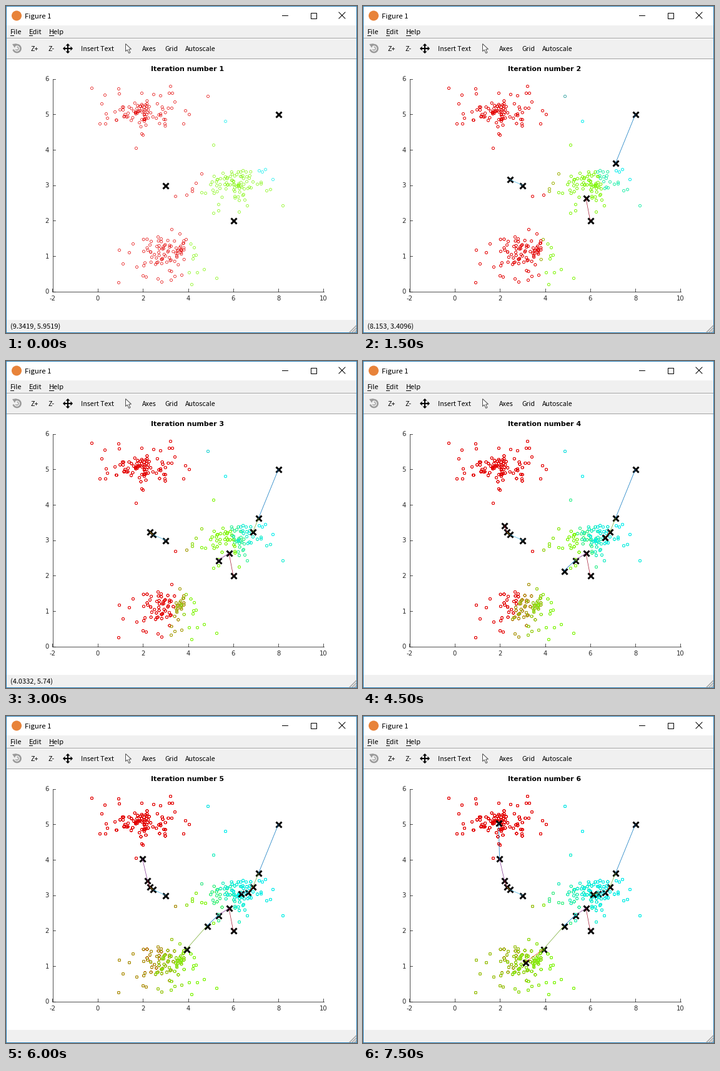
Write a matplotlib script that moves like this. It is 562 px wide and 523 px high and loops after 8000 ms.

```python
import numpy as np
import matplotlib.pyplot as plt
from matplotlib.animation import FuncAnimation
from matplotlib.patches import Arc, Circle, Polygon, Rectangle

W, H = 562, 523
DPI = 72  # one point equals one pixel
STEP_MS, TICK_MS, LOOP_MS = 1500, 500, 8000

UI = "Noto Sans CJK JP"
PLOT = "DejaVu Sans"
INK = "#262626"
PANEL = "#f0f0f0"
EDGE = "#a0a0a0"

PALETTE = np.array([(0.89, 0, 0), (0.5, 0.96, 0.03), (0.03, 0.93, 0.93)])
LINE_COLORS = ["#0072bd", "#d95319", "#edb120", "#7e2f8e",
               "#77ac30", "#4dbeee", "#a2142f"]

# Centroid positions per iteration, one row per cluster.
PATHS = np.array([
    [(3, 3), (2.43, 3.16), (2.31, 3.23), (2.20, 3.42), (1.98, 4.03), (1.95, 5.03)],
    [(6, 2), (5.81, 2.63), (5.33, 2.43), (4.83, 2.13), (3.92, 1.47), (3.13, 1.11)],
    [(8, 5), (7.12, 3.62), (6.87, 3.23), (6.65, 3.08), (6.34, 3.05), (6.12, 3.02)],
])
STEPS = PATHS.shape[1]
STATUS = ["(9.3419, 5.9519)", "(8.153, 3.4096)", "(4.0332, 5.74)", "", "", ""]

# Far-out samples in pixels; the dense cores are random.
OUTER = [
    (137, 131), (180, 132), (158, 142), (153, 156), (150, 188), (159, 188),
    (162, 179), (160, 172), (181, 140), (208, 227), (217, 204), (219, 206),
    (263, 128), (266, 139), (261, 139), (247, 143), (217, 139), (270, 153),
    (287, 167), (293, 173), (284, 188), (254, 188), (236, 141),
    (351, 184), (323, 144), (332, 222), (443, 319), (427, 277), (415, 261),
    (410, 265), (405, 263), (423, 293), (417, 295), (313, 268), (304, 283),
    (298, 292), (298, 296), (289, 302), (271, 304), (313, 298), (319, 299),
    (332, 331), (340, 317), (340, 327), (373, 329), (386, 319), (384, 265),
    (347, 267),
    (180, 442), (181, 390), (187, 412), (203, 380), (197, 394), (209, 417),
    (219, 431), (224, 433), (243, 436), (249, 441), (264, 438), (270, 432),
    (265, 357), (278, 364), (288, 373), (232, 376), (297, 445), (337, 435),
    (317, 421), (306, 426), (293, 426), (301, 386), (304, 398), (299, 404),
    (281, 430),
]

ORIGIN = np.array([74 + 2 * 434 / 12, 456])
SCALE = np.array([434 / 12, -340 / 6])


def to_px(p):
    return ORIGIN + np.asarray(p) * SCALE + 0.5


def to_data(p):
    return (np.asarray(p) - ORIGIN) / SCALE


def core(rng, center, spread, count):
    """Gaussian blob cut off at two deviations."""
    z = rng.normal(size=(count * 3, 2))
    z = z[np.hypot(z[:, 0], z[:, 1]) < 2][:count]
    return center + z * spread


def make_points():
    rng = np.random.default_rng(7)
    return to_data(np.vstack([
        OUTER,
        core(rng, (222, 172), (26, 13.5), 77),
        core(rng, (367, 286), (22, 14), 77),
        core(rng, (251, 396), (28, 15), 75),
    ]))


fig = plt.figure(figsize=(W / DPI, H / DPI), dpi=DPI, facecolor="white")
ax = fig.add_axes([0, 0, 1, 1])
ax.set(xlim=(0, W), ylim=(H, 0))
ax.axis("off")


def box(x, y, w, h, color):
    ax.add_patch(Rectangle((x, y), w, h, lw=0, fc=color, antialiased=False))


def stroke(xs, ys, color="black", lw=1.0, z=2, **kw):
    return ax.plot(xs, ys, color=color, lw=lw, zorder=z, **kw)[0]


def label(x, y, s, size, font=UI, color="black", **kw):
    return ax.text(x, y, s, fontsize=size, family=font, color=color,
                   va="baseline", **kw)


def draw_window():
    box(1, 31, W - 2, 54, PANEL)
    box(1, 502, W - 2, 20, PANEL)
    box(1, 51, W - 2, 1, EDGE)
    box(1, 52, W - 2, 1, "white")
    box(1, 84, W - 2, 1, EDGE)
    for x, y, w, h in [(0, 0, W, 1), (0, H - 1, W, 1), (0, 0, 1, H), (W - 1, 0, 1, H)]:
        box(x, y, w, h, "#2a80b9")

    ax.add_patch(Circle((17, 15.5), 8, fc="#e8833a", lw=0))
    label(30, 20, "Figure 1", 11.4)
    box(442, 15, 10, 1, "black")
    ax.add_patch(Rectangle((487.5, 10.5), 9, 9, fill=False, lw=1))
    stroke([533, 543], [10, 20])
    stroke([533, 543], [20, 10])

    for x, word, w in [(7, "File", 6), (37, "Edit", 6), (69, "Help", 8)]:
        label(x, 45, word, 11)
        box(x, 47, w, 1, "black")

    for x, word in [(40, "Z+"), (67, "Z-"), (120, "Insert Text"),
                    (218, "Axes"), (254, "Grid"), (287, "Autoscale")]:
        label(x, 72, word, 10.7)

    for k in range(3):
        d = 4 * k + 3
        stroke([W - 1 - d, W - 1], [H - 1, H - 1 - d], EDGE, 1.4)


def draw_icons():
    # rotate
    ax.add_patch(Arc((17.5, 68), 12, 12, theta1=-120, theta2=165, lw=2.6, ec="#9a9a9a"))
    ax.add_patch(Arc((17.5, 68), 5, 5, theta1=-90, theta2=150, lw=1.3, ec="#9a9a9a"))
    ax.add_patch(Polygon([(10, 61), (17, 60), (14, 67)], fc="#9a9a9a", lw=0))
    # pan
    c = np.array([99, 68])
    stroke([93, 105], [68, 68], lw=2)
    stroke([99, 99], [62, 74], lw=2)
    tip = np.array([(8, 0), (4.5, -3.5), (4.5, 3.5)])
    for _ in range(4):
        ax.add_patch(Polygon(c + tip, fc="black", lw=0))
        tip = tip[:, ::-1] * (-1, 1)
    # pointer
    ax.add_patch(Polygon([(191.5, 60.5), (191.5, 72.5), (194.2, 70), (196.8, 75.5),
                          (199, 74.5), (196.6, 69.2), (200.5, 69)],
                         fc="white", ec="#505050", lw=1))


def draw_axes():
    stroke([74.5, 508.5], [456.5, 456.5], INK, 0.8)
    stroke([74.5, 74.5], [116.5, 456.5], INK, 0.8)
    for v in range(-2, 11, 2):
        x = to_px((v, 0))[0]
        stroke([x, x], [452, 456.5], INK, 0.8)
        label(x, 471, str(v), 10, PLOT, INK, ha="center")
    for v in range(7):
        y = to_px((0, v))[1]
        stroke([74.5, 79], [y, y], INK, 0.8)
        label(69, y + 4, str(v), 10, PLOT, INK, ha="right")


def draw_layer(i, points):
    """Everything one iteration adds to the plot."""
    z = 5 + 3 * i
    centers = PATHS[:, i]
    gap = np.linalg.norm(points[:, None] - centers[None], axis=2)
    xy = to_px(points)
    items = [ax.scatter(xy[:, 0], xy[:, 1], s=4.1 ** 2, facecolors="none",
                        edgecolors=PALETTE[gap.argmin(axis=1)],
                        linewidths=0.7, zorder=z)]
    cx, cy = to_px(centers).T
    items.append(stroke(cx, cy, lw=0, z=z + 1, marker="x", ms=9, mew=3))
    if i:
        for j, path in enumerate(PATHS):
            xs, ys = to_px(path[i - 1:i + 1]).T
            color = LINE_COLORS[(4 * i + j + 1) % 7]
            items.append(stroke(xs, ys, color, 0.7, z + 2))
    return items


draw_window()
draw_icons()
draw_axes()
samples = make_points()
layers = [draw_layer(i, samples) for i in range(STEPS)]
title = label(290.5, 104, "", 11, PLOT, weight="bold", ha="center")
status = label(7, 516, "", 11)


def update(frame):
    step = min(frame * TICK_MS // STEP_MS, STEPS - 1)
    for i, items in enumerate(layers):
        for item in items:
            item.set_visible(i <= step)
    title.set_text(f"Iteration number {step + 1}")
    status.set_text(STATUS[step])
    return []


anim = FuncAnimation(fig, update, frames=LOOP_MS // TICK_MS, interval=TICK_MS,
                     init_func=lambda: update(0), repeat=True, repeat_delay=0,
                     blit=False)
plt.show()
```
